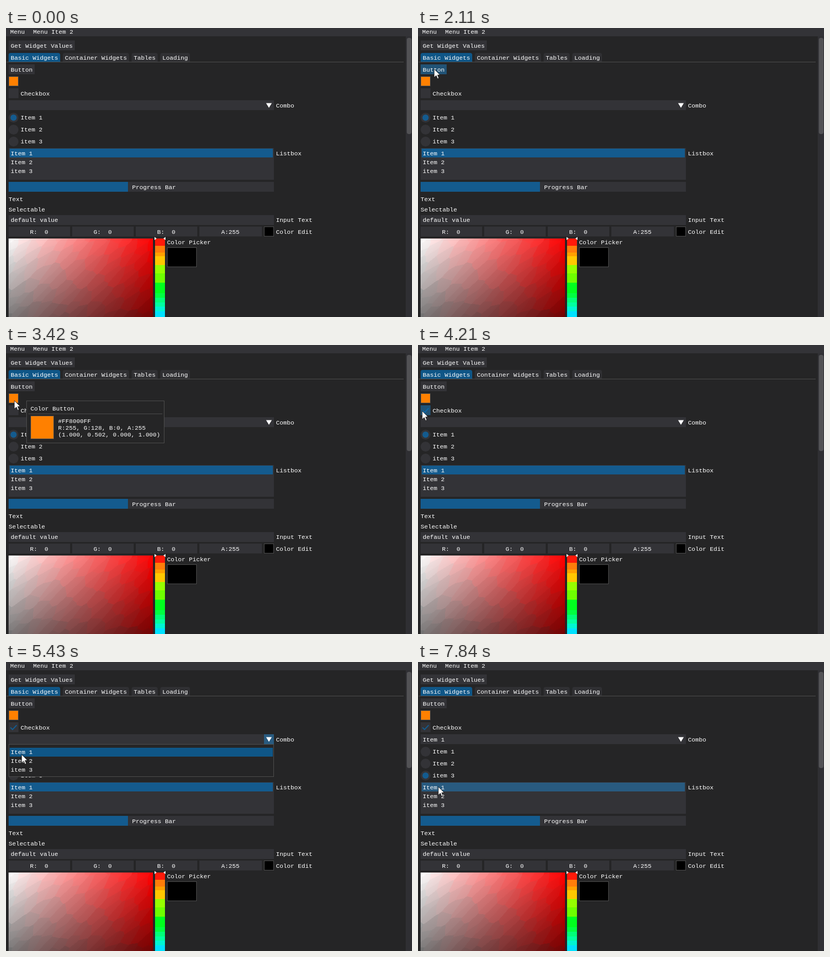
These frames come from a looping animation (779x556 px, 8 s). An HTML page with a canvas:

```html
<!DOCTYPE html>
<html lang="en">
<head>
<meta charset="utf-8">
<title>Widget demo</title>
<style>
html, body { margin: 0; width: 100%; height: 100%; overflow: hidden; background: #252526; }
canvas { display: block; }
</style>
</head>
<body>
<canvas id="stage" width="779" height="556"></canvas>
<script>
const LOOP = 8000, START = 190, STEP = 100.5;
const BG = '#252526', FRAME = '#333337', BORDER = '#4e4e4e', ORANGE = '#ff8000';
const HOVER = 'rgba(29,151,236,.404)', ACTIVE = 'rgba(0,119,200,.6)';
const ITEMS = ['Item 1', 'Item 2', 'item 3'];

const stage = document.getElementById('stage');
const base = document.createElement('canvas');
base.width = stage.width;
base.height = stage.height;
let g = base.getContext('2d');

function box(x, y, w, h, fill, radius = 0) {
  g.fillStyle = fill;
  g.beginPath();
  g.roundRect(x, y, w, h, radius);
  g.fill();
}

function outline(x, y, w, h) {
  g.strokeStyle = BORDER;
  g.lineWidth = 1;
  g.strokeRect(x + .5, y + .5, w - 1, h - 1);
}

function swatch(x, y, w, h, fill) {
  box(x, y, w, h, fill);
  outline(x, y, w, h);
}

function label(str, x, middle) {
  g.font = '11.667px "Liberation Mono", monospace';
  g.fillStyle = '#fff';
  g.fillText(str, x, middle + 4);
}

function shape(points, fill) {
  g.fillStyle = fill;
  g.beginPath();
  points.forEach(([x, y]) => g.lineTo(x, y));
  g.closePath();
  g.fill();
}

function disc(x, y, r, fill) {
  g.fillStyle = fill;
  g.beginPath();
  g.arc(x, y, r, 0, 7);
  g.fill();
}

// Saturation/value square in slanted, slightly uneven facets
function drawShades(left, top, size, height) {
  const img = g.createImageData(size, height), long = 34, wide = 13, k = Math.SQRT1_2;
  const rand = (i, j) => {
    const v = Math.sin(i * 127.1 + j * 311.7) * 43758.5;
    return v - Math.floor(v);
  };
  const clamp = v => Math.max(0, Math.min(size, v));
  for (let y = 0; y < height; y++) for (let x = 0; x < size; x++) {
    const a = (x - y) * k / long, b = (x + y) * k / wide;
    let best = 9, u = 0, v = 0;
    for (let i = Math.floor(a) - 1; i < a + 1; i++) for (let j = Math.floor(b) - 1; j < b + 1; j++) {
      const p = i + rand(i, j), q = j + rand(j + 50, i);
      const d = (p - a) ** 2 + (q - b) ** 2;
      if (d < best) { best = d; u = p; v = q; }
    }
    const sx = clamp((u * long + v * wide) * k), sy = clamp((v * wide - u * long) * k);
    const sat = (x * .5 + sx * .5) / size, val = 255 * (1 - (y * .5 + sy * .5) / size);
    const rest = val * (1 - sat);
    img.data.set([val, rest, rest, 255], (y * size + x) * 4);
  }
  g.putImageData(img, left, top);
}

function drawHues(x, y, w) {
  const bands = [[405, '#ff1a0a'], [419, '#ff7d0a'], [432, '#ffa000'], [439, '#ffc800'],
    [456, '#96ff00'], [472, '#6eff00'], [490, '#00ff1e'], [510, '#00ff41'],
    [519, '#00ff78'], [528, '#00ffa0'], [536, '#00f5d2'], [545, '#00e1ff']];
  bands.forEach(([top, fill]) => box(x, top, w, 556 - top, fill));
  shape([[x - 1, y - 3], [x + 3, y], [x - 1, y + 3]], '#fff');
  shape([[x + w + 1, y - 3], [x + w - 3, y], [x + w + 1, y + 3]], '#fff');
}

function drawBase() {
  box(0, 0, 779, 556, BG);
  box(0, 0, 779, 16, FRAME);
  label('Menu', 8, 7);
  label('Menu Item 2', 52, 7);
  box(767, 16, 12, 540, '#2f2f33');
  box(769, 19, 9, 185, '#525255', 4);

  box(5, 24, 127, 19, FRAME);
  label('Get Widget Values', 9, 34);
  let x = 5;
  for (const tab of ['Basic Widgets', 'Container Widgets', 'Tables', 'Loading']) {
    const w = tab.length * 7 + 8;
    box(x, 48, w, 17, x === 5 ? '#0f5687' : '#303033', [4, 4, 0, 0]);
    label(tab, x + 4, 57);
    x += w + 5;
  }
  box(1, 65, 762, 1, BORDER);

  swatch(5, 93, 19, 19, ORANGE);
  label('Checkbox', 28, 126);
  label('Combo', 518, 149);
  box(5, 231, 509, 61, FRAME);
  label('Listbox', 518, 241);
  box(5, 296, 509, 19, FRAME);
  box(5, 296, 229, 19, ACTIVE);
  label('Progress Bar', 242, 306);
  label('Text', 5, 329);
  label('Selectable', 5, 349);
  box(5, 360, 509, 19, FRAME);
  label('default value', 9, 369);
  label('Input Text', 518, 369);

  ['R:  0', 'G:  0', 'B:  0', 'A:255'].forEach((str, i) => {
    box(5 + i * 122, 382, i < 3 ? 118 : 120, 19, FRAME);
    label(str, 46 + i * 122 + (i > 2), 392);
  });
  swatch(495, 382, 19, 19, '#000');
  label('Color Edit', 518, 392);

  drawShades(5, 405, 277, 151);
  drawHues(286, 405, 19);
  label('Color Picker', 309, 412);
  swatch(309, 422, 57, 38, '#000');
}

// Pointer path: [step, x, y]
const PATH = [
  [0, 716, 547], [3, 708, 530], [5, 701, 518], [7, 709, 525], [8, 700, 519],
  [10, 530, 407], [12, 270, 236], [14, 90, 110], [16, 33, 69], [17, 32, 69],
  [19, 31, 79], [20, 31, 79], [22, 28, 88], [24, 24, 98], [25, 22, 99],
  [27, 18, 110], [29, 17, 106], [32, 16, 107], [33, 14, 109], [36, 5, 122],
  [39, 6, 123], [40, 8, 127], [42, 16, 142], [44, 22, 147], [46, 24, 148],
  [47, 24, 158], [48, 27, 172], [49, 31, 183], [50, 30, 178], [53, 30, 178],
  [57, 31, 183], [59, 31, 183], [62, 10, 192], [66, 6, 192], [69, 6, 214],
  [71, 7, 216], [75, 37, 240], [76, 39, 240]
];

function pointerAt(step) {
  const i = PATH.findIndex(p => p[0] > step);
  if (i < 0) return PATH[PATH.length - 1].slice(1);
  const [s0, x0, y0] = PATH[i - 1], [s1, x1, y1] = PATH[i];
  const f = (step - s0) / (s1 - s0);
  return [Math.round(x0 + (x1 - x0) * f), Math.round(y0 + (y1 - y0) * f)];
}

function drawTooltip(x, y) {
  swatch(x, y, 265, 82, BG);
  label('Color Button', x + 8, y + 15);
  box(x + 4, y + 25, 257, 1, BORDER);
  swatch(x + 8, y + 29, 45, 45, ORANGE);
  ['#FF8000FF', 'R:255, G:128, B:0, A:255', '(1.000, 0.502, 0.000, 1.000)']
    .forEach((line, i) => label(line, x + 61, y + 39 + i * 13));
}

function drawPointer(x, y) {
  const arrow = [[0, 0], [0, 16], [4, 12.5], [6.5, 18.5], [9, 17.5], [6.5, 11.5], [11, 11]];
  g.save();
  g.translate(x, y);
  shape(arrow, '#fff');
  g.strokeStyle = '#111';
  g.lineWidth = .8;
  g.stroke();
  g.restore();
}

function drawWidgets(step) {
  const shown = step >= 0;
  const [px, py] = shown ? pointerAt(step) : [-99, -99];
  const over = (x, y, w, h) => px >= x && px < x + w && py >= y && py < y + h;
  const open = step >= 45 && step < 53;
  const tint = (x, y, w, h) => { if (!open && over(x, y, w, h)) box(x, y, w, h, HOVER); };

  // Button
  box(5, 70, 50, 19, over(5, 70, 50, 19) ? BG : FRAME);
  tint(5, 70, 50, 19);
  label('Button', 9, 80);

  // Checkbox
  const onCheck = over(5, 116, 80, 19);
  box(5, 116, 19, 19, onCheck ? BG : FRAME);
  if (onCheck) box(5, 116, 19, 19, HOVER);
  if (step >= 38) {
    g.strokeStyle = ACTIVE;
    g.lineWidth = 2;
    g.beginPath();
    g.moveTo(8.5, 126);
    g.lineTo(12.5, 130);
    g.lineTo(20.5, 121.5);
    g.stroke();
  }

  // Combo
  box(5, 139, 509, 19, FRAME);
  tint(5, 139, 509, 19);
  if (open) box(495, 139, 19, 19, HOVER);
  shape([[499, 144.5], [510, 144.5], [504.5, 153.5]], '#fff');
  if (step >= 53) label(ITEMS[0], 9, 149);

  // Radio buttons
  const chosen = step >= 70 ? 2 : step >= 64 ? 1 : 0;
  ITEMS.forEach((item, i) => {
    const y = 172.5 + i * 23;
    disc(14.5, y, 9.5, FRAME);
    if (!open && over(5, y - 9.5, 66, 19)) disc(14.5, y, 9.5, HOVER);
    if (i === chosen) disc(14.5, y, 6, ACTIVE);
    label(item, 28, y - .5);
  });

  // Listbox
  ITEMS.forEach((item, i) => {
    const y = 232 + i * 17, hot = over(7, y, 505, 17);
    if (hot || i === 0) box(7, y, 505, 17, hot ? HOVER : ACTIVE);
    label(item, 9, y + 9);
  });

  if (open) {
    swatch(5, 158, 509, 63, BG);
    ITEMS.forEach((item, i) => {
      const y = 165 + i * 17;
      if (over(7, y, 505, 17)) box(7, y, 505, 17, step === 52 ? ACTIVE : HOVER);
      label(item, 9, y + 8);
    });
  }
  if (over(5, 93, 20, 19)) drawTooltip(px + 23, py);
  if (shown) drawPointer(px, py);
}

drawBase();
g = stage.getContext('2d', { alpha: false });

function frame() {
  const t = performance.now() % LOOP;
  g.drawImage(base, 0, 0);
  drawWidgets(Math.floor((t - START) / STEP));
  requestAnimationFrame(frame);
}
frame();
</script>
</body>
</html>
```
